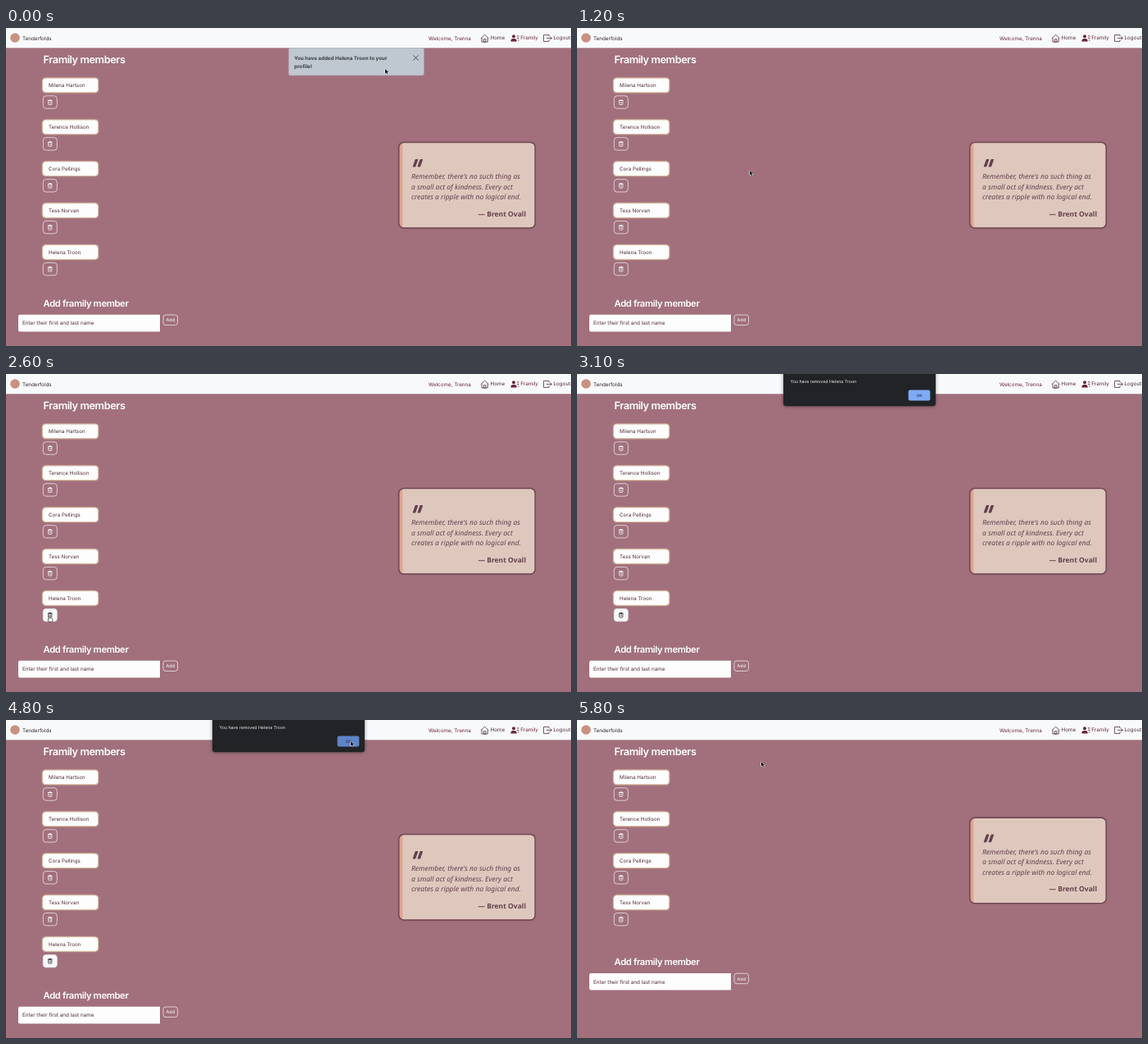
An HTML page with a canvas for the animation above (5900 ms loop, 690x388 px).

```html
<!DOCTYPE html>
<html lang="en">
<head>
<meta charset="utf-8">
<title>Framily members</title>
<style>
  html, body { margin: 0; width: 100%; height: 100%; overflow: hidden; background: #a1707c; }
  canvas { display: block; width: 690px; height: 388px; }
</style>
</head>
<body>
<canvas id="stage"></canvas>
<script>
const W = 690, H = 388, LOOP = 5900, STEP = 100;
const NAV_H = 24.3, ROW = 50.9;
const PAGE = '#a1707c', NAV = '#f8f9fb', INK = '#4f2b38', MAROON = '#6a2638', PLUM = '#62404c', OUTLINE = '#eee4e6';
const APP = 'Tenderfolds', USER = 'Trenna', AUTHOR = 'Brent Ovall', REMOVED = 'Helena Troon';
const MEMBERS = ['Milena Hartson', 'Terence Hollison', 'Cora Pellings', 'Tess Norvan', REMOVED];
const QUOTE = ["Remember, there's no such thing as", 'a small act of kindness. Every act', 'creates a ripple with no logical end.'];

const easeOut = k => 1 - (1 - k) ** 2;
const easeIn = k => k * k;
const MOVES = [
  { from: 0, to: 100, x: 501, y: 36 },
  { from: 300, to: 600, x: 500, y: 47 },
  { from: 700, to: 1200, x: 211, y: 174 },
  { from: 1200, to: 2000, x: 54, y: 289 },
  { from: 2000, to: 2600, x: 53, y: 295 },
  { from: 4000, to: 4100, x: 402, y: 32 },
  { from: 4100, to: 4700, x: 421, y: 26 },
  { from: 4900, to: 5000, x: 414, y: 27 },
  { from: 5000, to: 5800, x: 225, y: 51, ease: easeIn }
];

const canvas = document.getElementById('stage');
const ctx = canvas.getContext('2d');
const dpr = window.devicePixelRatio || 1;
canvas.width = W * dpr;
canvas.height = H * dpr;
ctx.textRendering = 'geometricPrecision';

function text(str, x, y, size, color, { weight = 400, family = 'Inter', style = '', align = 'left', spacing = 0 } = {}) {
  ctx.font = `${style} ${weight} ${size}px "${family}", sans-serif`;
  ctx.letterSpacing = spacing + 'px';
  ctx.textAlign = align;
  ctx.fillStyle = color;
  ctx.fillText(str, x, y);
}

function box(x, y, w, h, r, fill, stroke, line = 1) {
  ctx.beginPath();
  ctx.roundRect(x, y, w, h, r);
  if (fill) { ctx.fillStyle = fill; ctx.fill(); }
  if (stroke) { ctx.strokeStyle = stroke; ctx.lineWidth = line; ctx.stroke(); }
}

function glowBox(x, y, w, h, r, fill, glow, blur) {
  ctx.save();
  ctx.shadowColor = glow;
  ctx.shadowBlur = blur * dpr;
  box(x, y, w, h, r, fill);
  ctx.restore();
}

function line(color, width, ...points) {
  ctx.strokeStyle = color;
  ctx.lineWidth = width;
  ctx.beginPath();
  points.forEach(p => ctx.lineTo(...p));
  ctx.stroke();
}

function disc(x, y, r, fill) {
  box(x - r, y - r, 2 * r, 2 * r, r, fill);
}

function at(x, y, draw) {
  ctx.save();
  ctx.translate(x, y);
  draw();
  ctx.restore();
}

function house() {
  line(INK, 0.8, [-4.8, 0], [0, -4.6], [4.8, 0]);
  line(INK, 0.8, [-3.6, -1], [-3.6, 4.3], [3.6, 4.3], [3.6, -1]);
  box(-1.3, 1, 2.6, 3.3, 0, null, INK, 0.8);
}

function person() {
  disc(-1.6, -2.2, 2, MAROON);
  box(-5.2, 0.7, 7.3, 3.5, [3, 3, 0.6, 0.6], MAROON);
  for (const y of [-2.5, 0, 2.5]) line(MAROON, 0.9, [2.3 + Math.max(y, 0) / 2, y], [5, y]);
}

function exitDoor() {
  line(INK, 0.8, [1.8, -2.3], [1.8, -4], [-4.6, -4], [-4.6, 4], [1.8, 4], [1.8, 2.3]);
  line(INK, 0.8, [-1.2, 0], [5.2, 0]);
  line(INK, 0.8, [3.1, -2.1], [5.2, 0], [3.1, 2.1]);
}

function navBar() {
  ctx.fillStyle = NAV;
  ctx.fillRect(0, 0, W, NAV_H);
  disc(11, 12, 5.8, '#c9917f');
  text(APP, 20, 14.5, 6.3, '#2e2429');
  text('Welcome, ' + USER, 516, 14.5, 6.3, MAROON);
  text('Home', 591.5, 14.4, 6.3, INK);
  text('Framily', 628.3, 14.4, 6.3, MAROON);
  text('Logout', 668.5, 14.4, 6.3, INK);
  at(584.6, 12.7, house);
  at(621.6, 12.4, person);
  at(661.2, 12.4, exitDoor);
}

function trash(color) {
  line(color, 0.7, [-2.9, -2.1], [2.9, -2.1]);
  box(-1, -2.9, 2, 0.8, 0, null, color, 0.6);
  box(-2.1, -2.1, 4.2, 5, 0.6, null, color, 0.7);
  for (const x of [-0.75, 0.75]) line(color, 0.5, [x, -0.8], [x, 1.8]);
}

function member(name, hover) {
  glowBox(44.6, -8.7, 68, 17.6, 4, '#fefdfd', '#dec4a4', 2);
  box(44.6, -8.7, 68, 17.6, 4, null, '#d8bda0', 1);
  text(name, 52, 2.3, 6.25, INK);
  box(45.3, 13, 17, 15.4, 3.5, hover ? '#f8f9fa' : null, OUTLINE, 0.8);
  at(53.8, 20.8, () => trash(hover ? '#222' : '#fff'));
}

function addForm() {
  text('Add framily member', 45.5, 339.7, 11.3, '#fff', { weight: 600, spacing: -0.4 });
  box(15, 349.8, 173, 20.6, [2, 0, 0, 2], '#fefdfd');
  text('Enter their first and last name', 20, 362.4, 6.3, INK);
  box(192, 350, 17.6, 12.5, 3, null, OUTLINE, 0.8);
  text('Add', 200.8, 358.3, 5.5, '#fff', { align: 'center' });
}

function quoteCard() {
  glowBox(479.8, 139.6, 166.4, 104.4, 6, '#dec8be', 'rgba(70,30,45,.6)', 2);
  at(0, 0, () => {
    box(479.8, 139.6, 166.4, 104.4, 6);
    ctx.clip();
    ctx.fillStyle = '#dea58f';
    ctx.fillRect(479, 139, 5.3, 106);
  });
  box(479.8, 139.6, 166.4, 104.4, 6, null, '#70454f', 1.4);
  at(496.5, 169.6, () => {
    ctx.transform(1, 0, -0.35, 1, 0, 0);
    for (const x of [0, 5.8]) box(x, -9.6, 3.6, 9.6, 0.8, PLUM);
  });
  QUOTE.forEach((s, i) => text(s, 495, 184.3 + i * 12.5, 8.5, PLUM, { family: 'Noto Sans', style: 'italic' }));
  text('— ' + AUTHOR, 635, 229.8, 8.5, PLUM, { family: 'Noto Sans', weight: 600, align: 'right' });
}

function notice(focused) {
  box(345.3, 24.6, 165, 33.2, 2, '#bfc7d0', '#b2bac4', 0.5);
  text(`You have added ${REMOVED} to your`, 352, 38.9, 6.25, '#3a3c42', { weight: 700 });
  text('profile!', 352, 48.5, 6.25, '#3a3c42', { weight: 700 });
  if (focused) box(490.8, 24, 20, 22.6, 2.5, null, 'rgba(120,160,235,.7)', 1.5);
  at(500.5, 36.4, () => {
    for (const s of [-1, 1]) line('#46474d', 0.9, [-3.1, -3.1 * s], [3.1, 3.1 * s]);
  });
}

function dialog(fading, pressed) {
  ctx.save();
  if (fading) {
    ctx.translate(3.45, -2.4);
    ctx.scale(0.99, 0.99);
  }
  glowBox(252, -6, 186, 45.2, 3.5, '#222326', 'rgba(0,0,0,.45)', fading ? 1 : 4);
  text('You have removed ' + REMOVED, 260.5, 10.5, 5.25, '#eceded');
  box(404.7, 19.4, 26.6, 13.2, 2, pressed ? '#5f84c8' : '#7fabf5');
  text('OK', 418, 27.7, 4.8, '#1f2b45', { weight: 500, align: 'center' });
  if (fading) {
    // Let the page show through the whole dialog
    ctx.globalAlpha = 0.26;
    box(252, -6, 186, NAV_H + 8.4, 0, NAV);
    box(252, NAV_H + 2.4, 186, 36.8 - NAV_H, [0, 0, 3.5, 3.5], PAGE);
  }
  ctx.restore();
}

function arrow() {
  const shape = new Path2D('M0 0V5.6L1.3 4.5L2.2 6.4L3.2 5.9L2.4 4.1H4.1Z');
  ctx.strokeStyle = '#fff';
  ctx.lineWidth = 1;
  ctx.stroke(shape);
  ctx.fillStyle = '#111';
  ctx.fill(shape);
}

function hand() {
  box(-1.6, 3, 5.4, 4.2, 1.4, '#fff', '#222', 0.7);
  box(-0.7, 0, 1.5, 5, 0.7, '#fff', '#222', 0.6);
  box(-0.4, 3.3, 3.6, 3, 1, '#fff');
}

function pointer(t) {
  let x = 463, y = 50;
  for (const m of MOVES) {
    const k = Math.min(Math.max((t - m.from) / (m.to - m.from), 0), 1);
    const e = (m.ease || easeOut)(k);
    x += (m.x - x) * e;
    y += (m.y - y) * e;
  }
  return [x, y];
}

const within = (t, from, to) => t >= from && t < to;

function draw(t) {
  const removed = t >= 5000;
  ctx.setTransform(dpr, 0, 0, dpr, 0, 0);
  ctx.fillStyle = PAGE;
  ctx.fillRect(0, 0, W, H);
  navBar();
  text('Framily members', 45.5, 43, 12.8, '#fff', { weight: 600, spacing: -0.46 });
  MEMBERS.forEach((name, i) => {
    const last = name === REMOVED;
    if (!(last && removed)) at(0, 69.8 + i * ROW, () => member(name, last && t >= 2000));
  });
  at(0, removed ? -40.8 : 0, addForm);
  at(0, removed ? -20.4 : 0, quoteCard);

  if (t < 800) notice(t >= 300);
  if (within(t, 2900, 5100)) dialog(t < 3000 || removed, t >= 4700);
  if (!within(t, 2900, 4100)) {
    const overButton = within(t, 100, 600) || within(t, 2000, 2900);
    at(...pointer(t), overButton ? hand : arrow);
  }
}

const start = performance.now();
function tick() {
  const t = (performance.now() - start) % LOOP;
  draw(Math.floor(t / STEP) * STEP);
  requestAnimationFrame(tick);
}
tick();
</script>
</body>
</html>
```
